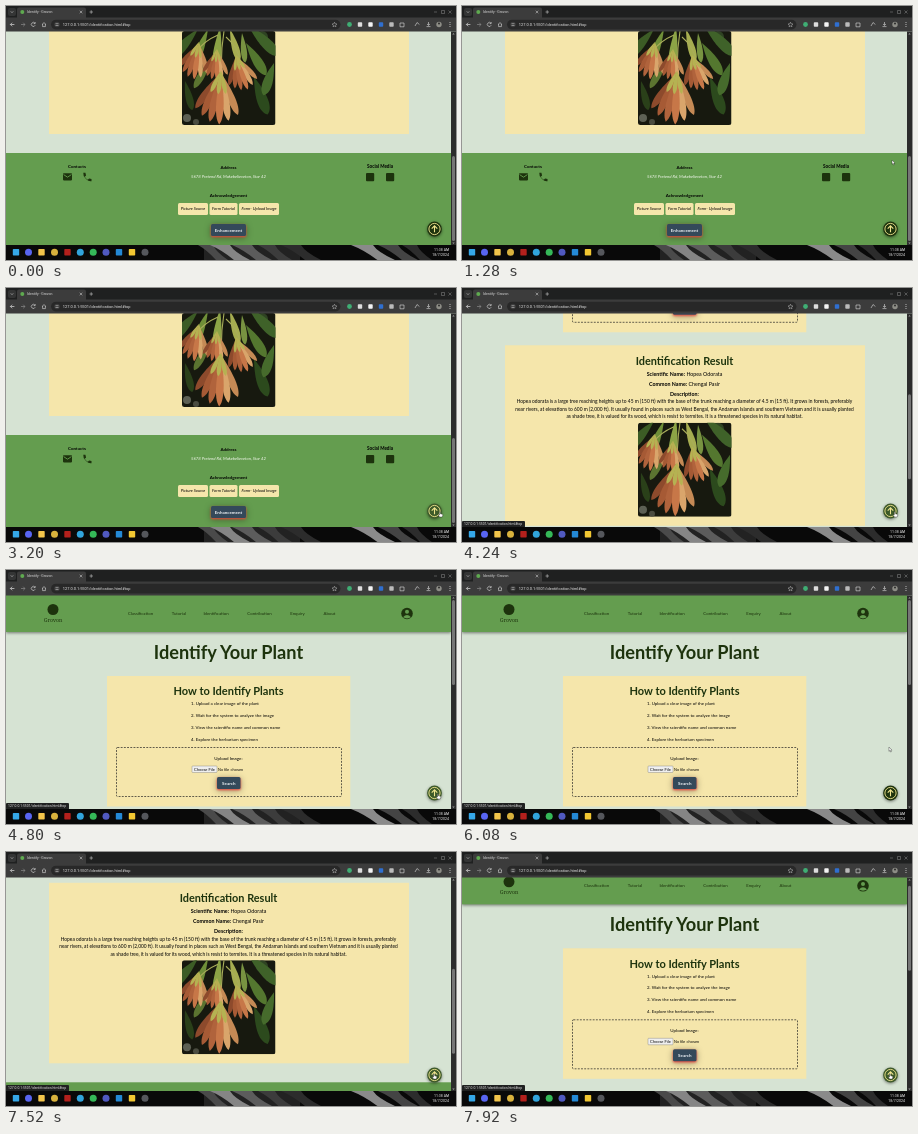
These frames come from a looping animation (450x254 px, 8000 ms). An HTML page:

```html
<!DOCTYPE html>
<html lang="en">
<head>
<meta charset="utf-8">
<title>Identify Your Plant</title>
<style>
html, body { margin: 0; width: 100%; height: 100%; overflow: hidden; background: #d6e3d3; }
svg { display: block; width: 100vw; height: 100vh; }
text { font-family: Lato, "Open Sans", sans-serif; white-space: pre; }
.b { font-weight: 700; }
.i { font-style: italic; }
.m { text-anchor: middle; }
.e { text-anchor: end; }
.ui { font-family: Roboto, sans-serif; }
.form { font-family: "Liberation Sans", sans-serif; }
.logo { font-family: "Noto Serif", serif; }
.shade { filter: drop-shadow(0 1px 1.5px #0007); }
.glow { filter: drop-shadow(0 1.2px .8px #e8413c) drop-shadow(0 1.5px 3px #0005); }
</style>
</head>
<body>
<svg id="stage" viewBox="0 0 450 254" preserveAspectRatio="none"></svg>
<script>
const INK = '#1d330d', CREAM = '#f5e6ab', GREEN = '#649d4f', LIGHT = '#dcdcdc';
const LOOP = 8000, BOTTOM = 302, URL_TEXT = '127.0.0.1:5501/identification.html#top';

const rect = (x, y, w, h, fill, more = '') =>
  `<rect x="${x}" y="${y}" width="${w}" height="${h}" fill="${fill}" ${more}/>`;
const dot = (x, y, r, fill, more = '') =>
  `<circle cx="${x}" cy="${y}" r="${r}" fill="${fill}" ${more}/>`;
const line = (d, stroke = LIGHT, w = .7) =>
  `<path d="${d}" fill="none" stroke="${stroke}" stroke-width="${w}"/>`;
// y is the vertical middle of the text
const text = (x, y, str, size, cls = '', fill = '#000') =>
  `<text x="${x}" y="${y + size * .34}" font-size="${size}" class="${cls}" fill="${fill}">${str}</text>`;
const mid = (y, str, size, cls = '', fill) => text(222.5, y, str, size, 'm ' + cls, fill);

// Pointed leaf hanging from (x, y), turned by a degrees
const leaf = (x, y, len, w, a, fill) =>
  `<path transform="translate(${x} ${y}) rotate(${a})" fill="${fill}"
    d="M0 0C${-w * .6} ${len * .4} ${-w} ${len * .85} 0 ${len}C${w} ${len * .85} ${w * .6} ${len * .4} 0 0"/>`;

// Bunch of slim winged petals with a yellow-green crown
function fruit(x, y, size, tilt) {
  const tones = ['#8d4a2c', '#c58a55', '#a65a35', '#d9a56b', '#b0633c', '#c77748'];
  return [30, -28, 18, -15, 7, -4].map((a, i) =>
    leaf(x, y, size * (.84 + .03 * i), size * .12, a + tilt, tones[i])).join('') +
    [20, -18, 1].map(a => leaf(x, y - 2, size * .45, size * .07, a + tilt, '#b5b252')).join('');
}

function photo() {
  const greens = [[16, -2, 40, 8, 42, '#3c5c25'], [66, -6, 44, 9, -45, '#3f6229'],
    [72, 46, 40, 9, -20, '#2c4a1d'], [3, 50, 30, 6, -14, '#2a4019'], [64, 12, 38, 8, -32, '#54772f'],
    [26, -2, 42, 7, 22, '#6f8f38'], [38, -4, 46, 7, 6, '#8ca446'], [48, -2, 34, 6, -16, '#a6ad50'],
    [92, 32, 34, 8, 18, '#466b2c'], [30, 26, 36, 6, 30, '#5b7430'], [60, 2, 30, 5, -6, '#789341']];
  return `<svg x="176" y="327" width="93.5" height="94" viewBox="0 0 93.5 94">
    ${rect(0, 0, 93.5, 94, '#17190f', 'rx="2.5"')}
    ${dot(5, 87, 4, '#5d6054')}${dot(14, 91, 3, '#4a4c40')}${dot(80, 6, 6, '#2f4323')}
    ${greens.map(g => leaf(...g)).join('')}
    ${line('M42 0Q38 25 40 50M44 6Q56 16 58 30M36 4Q22 10 15 20', '#a9ad5a', 1.1)}
    ${fruit(17, 13, 36, 12)}${fruit(54, 26, 35, -16)}${fruit(35, 20, 30, 4)}${fruit(39, 42, 52, 6)}
  </svg>`;
}

const button = (x, y, w, label) =>
  `<g class="glow">${rect(x, y, w, 12, '#34495a', 'rx="1.5"')}</g>` +
  text(x + w / 2, y + 6, label, 4.5, 'b m', '#f1f5f8');

function page() {
  const nav = [[134.5, 'Classification'], [173, 'Tutorial'], [210, 'Identification'],
    [253.5, 'Contribution'], [291.5, 'Enquiry'], [323.5, 'About']];
  const steps = ['Upload a clear image of the plant', 'Wait for the system to analyze the image',
    'View the scientific name and common name', 'Explore the herbarium specimen'];
  const about = [
    'Hopea odorata is a large tree reaching heights up to 45 m (150 ft) with the base of the trunk reaching a diameter of 4.5 m (15 ft). It grows in forests, preferably',
    'near rivers, at elevations to 600 m (2,000 ft). It usually found in places such as West Bengal, the Andaman Islands and southern Vietnam and it is usually planted',
    'as shade tree, it is valued for its wood, which is resist to termites. It is a threatened species in its natural habitat.'];
  const links = [[172, 30, 'Picture Source'], [203.5, 28, 'Form Tutorial'], [233, 40, 'Form- Upload Image']];
  return rect(0, 0, 450, 560, '#d6e3d3') +
    // header
    `<g class="shade">${rect(0, 20, 445, 42, GREEN)}</g>` +
    dot(47, 39.5, 5.5, INK) + text(47, 50, 'Grovon', 5.2, 'logo m', INK) +
    nav.map(([x, s]) => text(x, 43.5, s, 4.35, 'm', INK)).join('') +
    dot(401, 43.5, 5.8, INK) + dot(401, 41.8, 2, GREEN) +
    `<path d="M397 47.3Q401 42.6 405 47.3Q401 49.6 397 47.3" fill="${GREEN}"/>` +
    mid(82.5, 'Identify Your Plant', 18.2, 'b', INK) +
    // upload card
    rect(101, 106, 243.3, 130.5, CREAM) +
    mid(121.5, 'How to Identify Plants', 11.05, 'b', INK) +
    steps.map((s, i) => text(185, 133.8 + i * 11.8, `${i + 1}. ${s}`, 4.4)).join('') +
    rect(110.5, 177.5, 225, 49, 'none', 'stroke="#222" stroke-width=".7" stroke-dasharray="1.9 1.3" rx="1"') +
    mid(188, 'Upload Image:', 4.5) +
    rect(186, 196, 25, 6.5, '#efefef', 'stroke="#777" stroke-width=".4" rx=".7"') +
    text(198.5, 199.2, 'Choose File', 3.9, 'form m') + text(212, 199.2, 'No file chosen', 4, 'form') +
    button(211, 207, 23.5, 'Search') +
    // result card
    rect(43, 249.5, 360, 180.5, CREAM) +
    mid(265.5, 'Identification Result', 10.9, 'b', INK) +
    mid(278.3, '<tspan class="b">Scientific Name:</tspan> Hopea Odorata', 5.3) +
    mid(288.3, '<tspan class="b">Common Name:</tspan> Chengal Pasir', 5.3) +
    mid(298.3, 'Description:', 5.3, 'b') +
    about.map((s, i) => mid(306 + i * 7.5, s, 4.86)).join('') + photo() +
    // footer
    rect(0, 449, 445, 100, GREEN) +
    text(71, 462, 'Contacts', 4.5, 'b m') + text(374, 462, 'Social Media', 4.6, 'b m') +
    rect(57, 469.2, 9, 7.2, INK, 'rx=".8"') + line('M57.6 470.6L61.5 473.2L65.4 470.6', GREEN, .9) +
    `<path transform="translate(76.8 468.8)" fill="${INK}"
      d="M.5 0H2.6L3.3 2.6L1.9 3.9Q3 6 5 7L6.3 5.6L8.7 6.2V8.4Q6 9 3 6Q0 3 .5 0"/>` +
    rect(360, 469, 8.2, 8.2, INK, 'rx="1"') + rect(380, 469, 8.2, 8.2, INK, 'rx="1"') +
    mid(463.5, 'Address', 4.5, 'b') +
    mid(472.5, '5678 Pretend Rd, Makebelieveton, Star 42', 4.25, 'i', '#f4f8ee') +
    mid(491, 'Acknowledgement', 4.5, 'b') +
    links.map(([x, w, s]) => rect(x, 499, w, 12, CREAM, 'rx="1.5"') +
      text(x + w / 2, 505, s, 4.15, 'i m')).join('') +
    button(205, 520, 35, 'Enhancement');
}

function browser() {
  const tools = [[343.5, '#3fae74'], [354, '#ddd'], [364.5, '#f4f4f4'], [375, '#2f6fd0'], [385.5, '#bbb']];
  return rect(0, 0, 450, 12, '#1f2020') + rect(2, 2, 8, 8, '#343535', 'rx="2"') +
    line('M4.8 5.4L6 6.6L7.2 5.4', LIGHT, .6) +
    rect(11, 1.5, 69, 12, '#3c3c3c', 'rx="2"') + dot(16.3, 6, 2, '#5faa50') +
    text(21, 6, 'Identify - Grovon', 3.5, 'ui', LIGHT) +
    line('M73.7 4.7L76.3 7.3M76.3 4.7L73.7 7.3M83.5 6H87M85.2 4.2V7.8', LIGHT, .5) +
    line('M428 6H431M435.5 4.5H438.5V7.5H435.5ZM442.5 4.5L445.5 7.5M445.5 4.5L442.5 7.5', '#aaa', .4) +
    rect(0, 11.5, 450, 14, '#3c3c3c') + rect(45, 13.8, 289.5, 9.6, '#282828', 'rx="4.8"') +
    line('M8.4 18.5H4.4L6.2 16.7M4.4 18.5L6.2 20.3') +
    line('M15 18.5H19L17.2 16.7M19 18.5L17.2 20.3', '#888') +
    line('M29 17.3A2 2 0 1 0 29.2 19.2M29.2 16V17.6H27.6M36 18.5L38 16.6L40 18.5M36.6 18V20.6H39.4V18', LIGHT, .6) +
    dot(51, 18.5, 2.8, '#3c3c3c') + line('M49.5 17.7H52.5M49.5 19.5H52.5', LIGHT, .5) +
    text(56.8, 18.6, URL_TEXT, 3.95, 'ui', '#e6e6e6') +
    line('M328.5 16.2L329.2 17.8L331 18L329.6 19.2L330 20.8L328.5 20L327 20.8L327.4 19.2L326 18L327.8 17.8Z', LIGHT, .4) +
    tools.map(([x, c], i) => i ? rect(x - 2.2, 16.3, 4.4, 4.4, c, 'rx=".8"') : dot(x, 18.5, 2.4, c)).join('') +
    line('M394 17H398V20.8H394ZM409 20L411 16.5L413.4 18.5M420.5 20.6H424.5M422.5 16V19.3L421 18M422.5 19.3L424 18', LIGHT, .6) +
    dot(433, 18.5, 2.7, '#8d8d86') + dot(433, 17.6, 1, '#2b2b2b') +
    [16.6, 18.5, 20.4].map(y => dot(444, y, .5, LIGHT)).join('') +
    rect(445, 25.5, 5, 214, '#2c2c2c') +
    `<path d="M446.3 28.6L447.5 26.9L448.7 28.6ZM446.3 236.4L447.5 238.1L448.7 236.4Z" fill="#999"/>` +
    rect(446, 0, 3, 85, '#767676', 'rx="1.5" id="thumb"');
}

function taskbar() {
  const apps = [[10, '#35a7e8', 1], [22.5, '#5865f2'], [35.5, '#f3c54b', 1], [48.5, '#d9b23d'], [61.5, '#b3201c', 1],
    [74.3, '#31a4dc'], [87.2, '#35b858'], [100, '#5059c0'], [113, '#2489d6', 1], [126, '#f2c732', 1], [139, '#55575c']];
  const wash = [[192, 30, '#4a4a4a'], [204, 40, '#858585'], [226, 40, '#5c5c5c'], [252, 34, '#3c3c3c'],
    [275, 40, '#2c2c2c'], [345, 44, '#8a8a8a'], [372, 40, '#444'], [396, 30, '#2c2c2c']];
  return rect(0, 239, 450, 15, '#090909') + rect(198, 239, 96, 15, '#222') +
    wash.map(([x, w, c]) => `<path fill="${c}" d="M${x} 239H${x + w * .5}Q${x + w * .6} 246 ${x + w} 254H${x + w * .6}Q${x + w * .3} 244 ${x} 239"/>`).join('') +
    apps.map(([x, c, box]) => box ? rect(x - 3.2, 243, 6.4, 6.4, c, 'rx=".7"') : dot(x, 246.2, 3.5, c)).join('') +
    text(443, 243.6, '11:38 AM', 3.5, 'ui e', '#eee') + text(443, 249, '18/7/2024', 3.5, 'ui e', '#eee');
}

const $ = id => document.getElementById(id);
$('stage').innerHTML = `
  <g id="page">${page()}</g>
  <g class="shade">${dot(428.5, 223, 7.4, INK, 'id="top"')}</g>
  ${dot(428.5, 223, 5.6, 'none', 'stroke="#f0e58f" stroke-width=".9"')}
  ${line('M428.5 226.3V220M425.7 222.6L428.5 219.8L431.3 222.6', '#f0e58f', 1.1)}
  <g id="status">${rect(0, 233, 63, 6.5, '#202121', 'rx="1"')}${text(2, 236.2, URL_TEXT, 3.4, 'ui', '#e2e2e2')}</g>
  ${browser()}${taskbar()}
  <g id="mouse" stroke="#111" stroke-width=".35" fill="#fff">
    <path id="arrow" d="M0 0V4.3L1 3.4L1.7 5L2.4 4.7L1.7 3.1H3Z"/>
    <path id="hand" d="M-.5 0Q0 -.6 .5 0V1.8L2.6 2.3Q3 2.5 2.8 3.6L2.3 5H-.4L-1.7 3Q-1.4 2.3 -.5 3Z"/>
  </g>`;

const ease = u => (1 - Math.cos(Math.PI * Math.min(1, Math.max(0, u)))) / 2;

const scrollAt = t => BOTTOM *
  (1 - ease((t - 3932) / 750) + ease((t - 6178) / 600) - ease((t - 7257) / 750));

// time, x, y
const path = [[0, 453, 104], [160, 453, 104], [800, 432, 150], [1280, 430, 154], [2000, 431, 157],
  [3050, 434, 224], [3900, 433, 224], [5650, 431, 224], [6000, 427, 177], [6700, 426, 178.5],
  [6850, 426, 178.5], [7140, 428, 222], [LOOP, 428, 222]];

function mouseAt(t) {
  const k = path.findIndex(p => p[0] > t), [t0, x0, y0] = path[k - 1], [t1, x1, y1] = path[k];
  const u = ease((t - t0) / (t1 - t0));
  return [x0 + (x1 - x0) * u, y0 + (y1 - y0) * u];
}

const show = (id, on) => $(id).setAttribute('visibility', on ? 'visible' : 'hidden');

function draw(now) {
  const t = now % LOOP, scroll = scrollAt(t), [x, y] = mouseAt(t);
  const hover = Math.hypot(x - 428.5, y - 223) < 7.6;
  $('page').setAttribute('transform', `translate(0 ${-scroll})`);
  $('thumb').setAttribute('y', 30 + scroll * .397);
  $('mouse').setAttribute('transform', `translate(${x} ${y})`);
  $('top').setAttribute('fill', hover ? '#3d5a29' : INK);
  show('arrow', !hover);
  show('hand', hover);
  show('status', t > 3280 && t < 6160 || t > 7140);
  requestAnimationFrame(draw);
}
requestAnimationFrame(draw);
</script>
</body>
</html>
```
